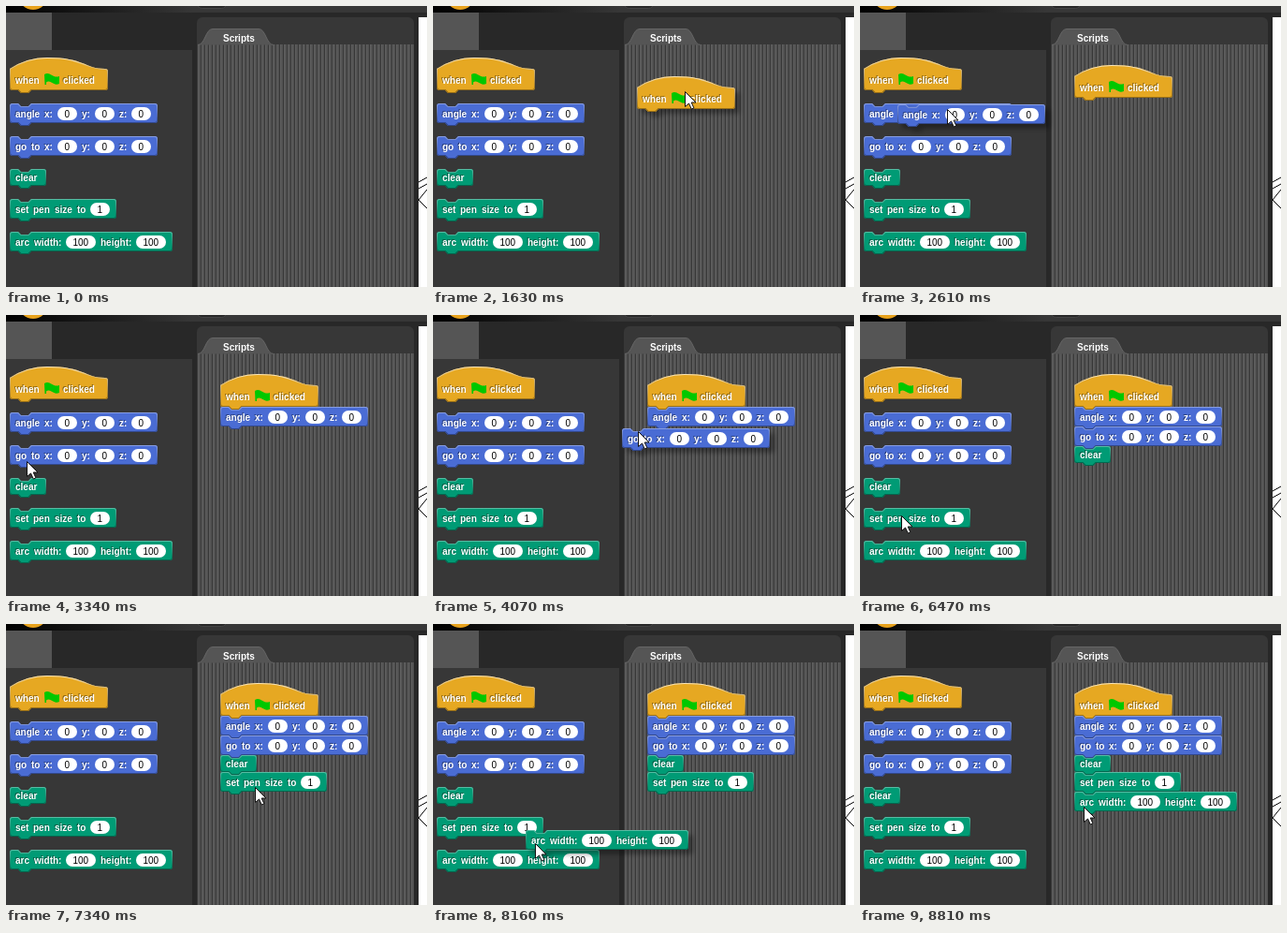
Write an HTML page with a canvas that moves like this. It is 450 px wide and 300 px high and loops after 9.42 s.

```html
<!DOCTYPE html>
<html lang="en">
<head>
<meta charset="utf-8">
<title>Building a script from blocks</title>
<style>
html, body { margin: 0; height: 100%; overflow: hidden; background: #282828; }
canvas { display: block; }
</style>
</head>
<body>
<canvas id="stage" width="450" height="300"></canvas>
<script>
const ctx = document.getElementById('stage').getContext('2d');
const LOOP = 9420, STEP = 40, SCRIPT_X = 229, PALETTE_X = 4;
const FONT = '10px "Liberation Sans", Arial, sans-serif';
const GOLD = [230, 168, 34], BLUE = [74, 108, 212], GREEN = [0, 155, 117];
const BACK = '#282828', FRAME = '#373737', GROUP = '#555';
const STRIPES = [FRAME, '#5f5f5f', GROUP, '#525252'];

// move: cursor travel to the palette; drag keys: [step, x, y]; grip: cursor offset in the block
const blocks = [
  { label: 'when @ clicked', color: GOLD, hat: 12, h: 35, minW: 105, y: 55, endY: 63,
    move: 460, moveSteps: 8, rest: [49, 74], drag: 990, drop: 1880, grip: [51, 16],
    keys: [[0, 17, 56], [16, 218, 75], [18, 229, 63]] },
  { label: 'angle x: 0 y: 0 z: 0', color: BLUE, h: 21, y: 104, endY: 98,
    move: 1880, moveSteps: 11, bend: [-121, 211], rest: [52, 108], drag: 2530, drop: 3180, grip: [53, 5],
    keys: [[0, 21, 104], [2, 40, 105], [12, 221, 101]] },
  { label: 'go to x: 0 y: 0 z: 0', color: BLUE, h: 21, y: 139, endY: 119,
    move: 3180, moveSteps: 8, bend: [30, 197], rest: [15, 145], drag: 3750, drop: 4610, grip: [17, 3],
    keys: [[0, 12, 138], [8, 202, 121], [14, 243, 122]] },
  { label: 'clear', color: GREEN, h: 18, minW: 39, y: 174, endY: 140,
    move: 4610, moveSteps: 11, rest: [25, 184], drag: 5300, drop: 6070, grip: [38, 2],
    keys: [[0, 22, 174], [4, 146, 172], [9, 343, 152], [15, 231, 142]] },
  { label: 'set pen size to 1', color: GREEN, h: 21, y: 206, endY: 158,
    move: 6070, moveSteps: 11, rest: [44, 214], drag: 6680, drop: 7340, grip: [47, 12],
    keys: [[0, 9, 205], [11, 219, 162]] },
  { label: 'arc width: 100 height: 100', color: GREEN, h: 21, y: 241, endY: 179,
    move: 7340, moveSteps: 9, rest: [9, 255], drag: 7920, drop: 8810, grip: [10, 14],
    keys: [[0, 9, 246], [18, 229, 181]] }
];

const add = (a, b) => a.map((v, i) => v + b[i]);
const rgb = (c, mix, k) => `rgb(${c.map(v => Math.round(v + (mix - v) * k))})`;

function rect(x, y, w, h, fill) {
  ctx.fillStyle = fill;
  ctx.fillRect(x, y, w, h);
}

function polygon(points) {
  ctx.beginPath();
  points.forEach(p => ctx.lineTo(...p));
  ctx.closePath();
}

// Place words, slots and the flag along a block
for (const b of blocks) {
  let x = 6;
  b.parts = b.label.split(' ').map(text => {
    const slot = /\d/.test(text), flag = text === '@';
    ctx.font = (slot ? '' : 'bold ') + FONT;
    const w = flag ? 15 : Math.round(ctx.measureText(text).width + (slot ? 15 : 0));
    const part = { text, slot, flag, x, w };
    x += w + 5;
    return part;
  });
  b.w = Math.max(b.minW || 0, x + 2);
}

function outline({ w, h, hat }) {
  const r = 3, top = hat || 0;
  ctx.beginPath();
  if (hat) {
    const R = 72.7, a = 2 * Math.atan(0.3);
    ctx.arc(40, R, R, -Math.PI / 2 - a, -Math.PI / 2);
    ctx.bezierCurveTo(80, 0, 80, top, w - r, top);
  } else {
    ctx.moveTo(0, r);
    ctx.arcTo(0, 0, r, 0, r);
    for (const p of [[9, 0], [12, 3], [20, 3], [23, 0]]) ctx.lineTo(...p);
  }
  ctx.arcTo(w, top, w, top + r, r);
  ctx.arcTo(w, h, w - r, h, r);
  for (const p of [[23, h], [20, h + 3], [12, h + 3], [9, h]]) ctx.lineTo(...p);
  ctx.arcTo(0, h, 0, h - r, r);
  ctx.closePath();
}

function drawFlag(x, y) {
  ctx.beginPath();
  ctx.moveTo(x, y);
  ctx.bezierCurveTo(x + 6, y - 4, x + 9, y + 5, x + 16, y + 2);
  ctx.lineTo(x + 16, y + 10);
  ctx.bezierCurveTo(x + 9, y + 13, x + 7, y + 5, x + 2, y + 8.5);
  ctx.lineTo(x + 2, y + 11);
  ctx.lineTo(x + 0.5, y + 11);
  ctx.closePath();
  ctx.fillStyle = '#00c800';
  ctx.fill();
}

function drawBlock(b, x, y, held) {
  ctx.save();
  ctx.translate(Math.round(x), Math.round(y));
  outline(b);
  ctx.save();
  if (held) {
    ctx.shadowColor = 'rgba(0,0,0,.35)';
    ctx.shadowOffsetX = ctx.shadowOffsetY = 5;
    ctx.shadowBlur = 5;
  }
  ctx.fillStyle = rgb(b.color, 0, 0);
  ctx.fill();
  ctx.restore();

  ctx.save();
  ctx.clip();
  const edge = ctx.createLinearGradient(0, 0, 0, b.h);
  edge.addColorStop(0, rgb(b.color, 255, b.hat ? 0.7 : 0.35));
  edge.addColorStop(1, rgb(b.color, 0, 0.35));
  ctx.strokeStyle = edge;
  ctx.lineWidth = 2;
  ctx.stroke();
  ctx.restore();

  const base = b.hat ? 28 : b.h > 18 ? 15 : 13;
  for (const p of b.parts) {
    if (p.flag) { drawFlag(p.x, base - 10); continue; }
    if (p.slot) {
      ctx.beginPath();
      ctx.roundRect(p.x, 4, p.w, 14, 7);
      ctx.fillStyle = '#fff';
      ctx.fill();
      ctx.font = FONT;
      ctx.fillStyle = '#000';
      ctx.fillText(p.text, p.x + 7.5, base);
    } else {
      ctx.font = 'bold ' + FONT;
      ctx.fillStyle = rgb(b.color, 0, 0.4);
      ctx.fillText(p.text, p.x - 1, base - 1);
      ctx.fillStyle = '#fff';
      ctx.fillText(p.text, p.x, base);
    }
  }
  ctx.restore();
}

function drawCursor([x, y]) {
  ctx.save();
  ctx.translate(Math.round(x) + 0.5, Math.round(y) + 0.5);
  polygon([[0, 0], [0, 16], [4, 12.5], [6.8, 18.5], [9.4, 17.4], [6.7, 11.5], [11.5, 11.5]]);
  ctx.fillStyle = '#fff';
  ctx.fill();
  ctx.strokeStyle = '#111';
  ctx.lineWidth = 1;
  ctx.stroke();
  ctx.restore();
}

function drawWindow() {
  rect(0, 0, 450, 300, BACK);
  const bar = ctx.createLinearGradient(0, 0, 200, 0);
  bar.addColorStop(0, '#000');
  bar.addColorStop(1, FRAME);
  rect(0, 0, 450, 7, bar);
  ctx.beginPath();
  ctx.arc(29, -12, 16, 0, 7);
  ctx.fillStyle = '#e8a21c';
  ctx.fill();
  ctx.beginPath();
  ctx.roundRect(204.5, -14, 31, 16.5, 5);
  ctx.fillStyle = BACK;
  ctx.fill();
  ctx.strokeStyle = '#444';
  ctx.lineWidth = 1;
  ctx.stroke();

  rect(0, 7, 49, 40, GROUP);
  rect(0, 47, 199, 253, FRAME);
  ctx.beginPath();
  ctx.roundRect(204, 12, 232, 300, 6);
  ctx.fillStyle = FRAME;
  ctx.fill();
  for (let x = 0; x < 232; x++) rect(204 + x, 41, 1, 259, STRIPES[x % 4]);

  ctx.beginPath();
  ctx.moveTo(205, 41.5);
  ctx.bezierCurveTo(213, 41.5, 213, 24.5, 221, 24.5);
  ctx.lineTo(270, 24.5);
  ctx.bezierCurveTo(278, 24.5, 278, 41.5, 286, 41.5);
  ctx.fillStyle = GROUP;
  ctx.fill();
  ctx.strokeStyle = '#666';
  ctx.stroke();
  ctx.font = 'bold ' + FONT;
  ctx.fillStyle = '#fff';
  ctx.fillText('Scripts', 232, 38);

  rect(441, 12, 9, 288, '#fff');
  ctx.save();
  ctx.beginPath();
  ctx.rect(441, 12, 9, 288);
  ctx.clip();
  ctx.beginPath();
  for (const [a, b, c, d] of [[441, 188, 450, 183], [441, 195, 450, 190], [441, 207, 450, 196], [441, 207, 450, 216]]) {
    ctx.moveTo(a, b);
    ctx.lineTo(c, d);
  }
  ctx.strokeStyle = '#000';
  ctx.stroke();
  ctx.restore();
}

// Smooth curve through the drag keys, coming to rest at the last one
function dragPos({ keys, drag }, t) {
  const last = keys.length - 1;
  const s = Math.min(keys[last][0], Math.floor((t - drag) / STEP));
  let i = 0;
  while (i < last - 1 && s >= keys[i + 1][0]) i++;
  const slope = (n, c) => {
    if (n === last) return 0;
    const a = keys[Math.max(0, n - 1)], b = keys[n + 1];
    return (b[c] - a[c]) / (b[0] - a[0]);
  };
  const a = keys[i], b = keys[i + 1], d = b[0] - a[0], u = (s - a[0]) / d;
  return [1, 2].map(c => a[c] + (b[c] - a[c]) * u * u * (3 - 2 * u)
    + d * u * (1 - u) * (slope(i, c) * (1 - u) - slope(i + 1, c) * u));
}

function cursorPos(t) {
  const i = blocks.findLastIndex(b => t >= b.move);
  if (i < 0) return null;
  const b = blocks[i];
  if (t >= b.drag) return add(dragPos(b, t), b.grip);
  const prev = blocks[i - 1];
  const from = prev ? add(prev.keys.at(-1).slice(1), prev.grip) : [380, 65];
  const k = Math.min(1, Math.floor((t - b.move) / STEP) / b.moveSteps);
  const u = 1 - (1 - k) ** 3;
  return b.rest.map((to, c) => {
    const mid = b.bend ? b.bend[c] : (from[c] + to) / 2;
    return from[c] * (1 - u) ** 2 + 2 * mid * u * (1 - u) + to * u * u;
  });
}

function draw(t) {
  drawWindow();
  for (const b of blocks) drawBlock(b, PALETTE_X, b.y);
  for (const b of blocks) if (t >= b.drop) drawBlock(b, SCRIPT_X, b.endY);
  const held = blocks.find(b => t >= b.drag && t < b.drop);
  if (held) drawBlock(held, ...dragPos(held, t), true);
  const tip = cursorPos(t);
  if (tip) drawCursor(tip);
}

const start = performance.now();
function frame() {
  draw((performance.now() - start) % LOOP);
  requestAnimationFrame(frame);
}
frame();
</script>
</body>
</html>
```
